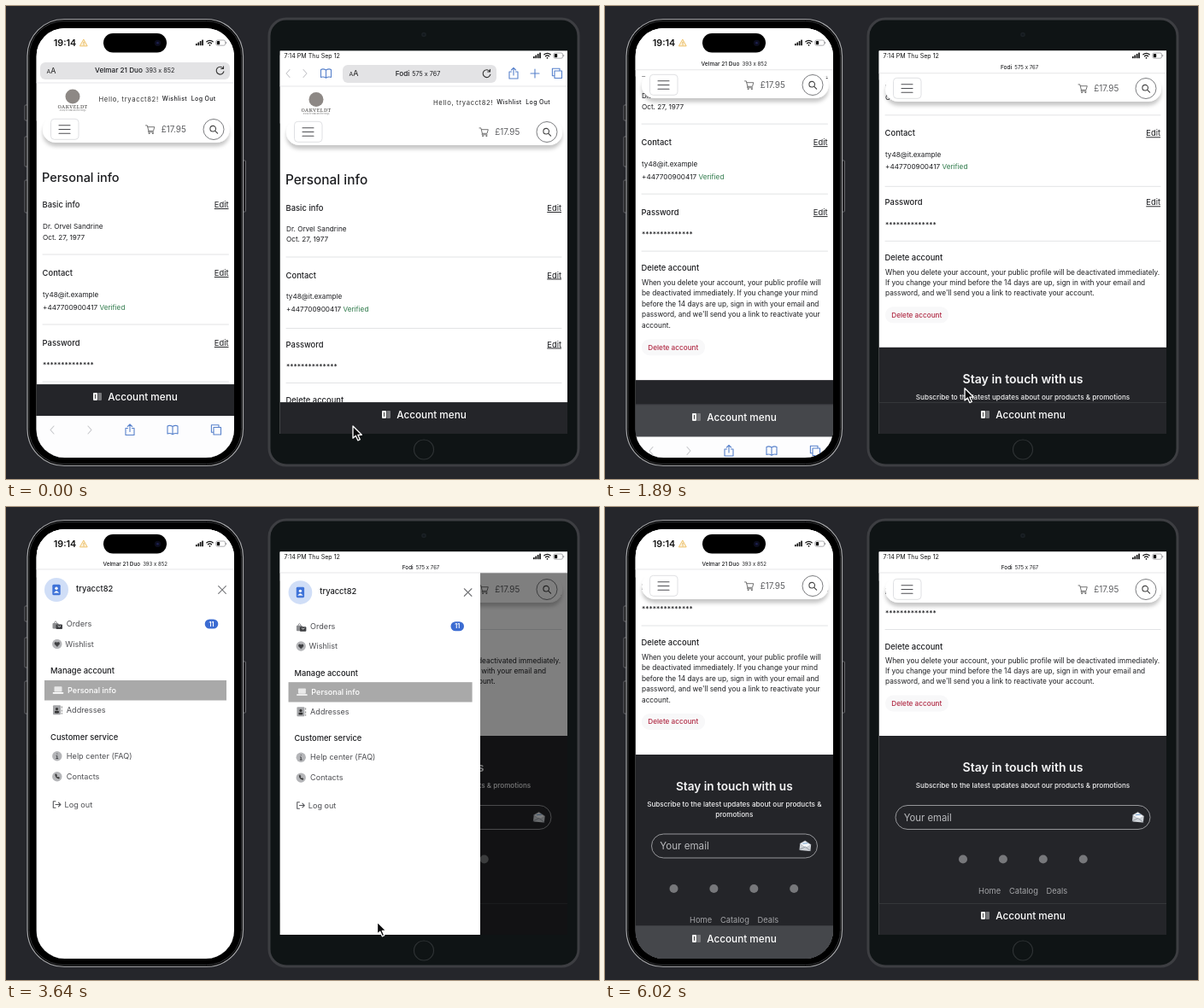
These frames come from a looping animation (694 by 554 pixels, 6440 ms). An HTML page:

```html
<!DOCTYPE html>
<html lang="en">
<head>
<meta charset="utf-8">
<title>Account menu on two devices</title>
<style>
html, body { margin: 0; width: 100%; height: 100%; overflow: hidden; background: #25262b; }
svg { display: block; width: 694px; height: 554px; font-family: Inter, Roboto, sans-serif; }
text { white-space: pre; }
</style>
</head>
<body>
<svg id="stage" viewBox="0 0 694 554" xmlns="http://www.w3.org/2000/svg"></svg>
<script>
const LOOP = 6440, STEP = 70;
const DARK = '#242529', BLUE = '#5680cb';

// Markup helpers
const text = (x, y, s, size, fill = '#1c1d20', weight = 400, extra = '') =>
  `<text x="${x}" y="${y}" font-size="${size}" fill="${fill}" font-weight="${weight}" ${extra}>${s}</text>`;
const mid = 'text-anchor="middle"', end = 'text-anchor="end"';
const rect = (x, y, w, h, fill, rx = 0, extra = '') =>
  `<rect x="${x}" y="${y}" width="${w}" height="${h}" rx="${rx}" fill="${fill}" ${extra}/>`;
const disc = (x, y, r, fill, extra = '') => `<circle cx="${x}" cy="${y}" r="${r}" fill="${fill}" ${extra}/>`;
const line = (d, stroke, w = 1, fill = 'none') =>
  `<path d="${d}" fill="${fill}" stroke="${stroke}" stroke-width="${w}" stroke-linecap="round" stroke-linejoin="round"/>`;
const at = (x, y, s) => `<g transform="translate(${x} ${y})">${s}</g>`;
const group = (id, s, extra = '') => `<g id="${id}" ${extra}>${s}</g>`;

const phone = {
  id: 'p', x: 35.5, y: 26, w: 231.5, h: 503, rx: 33, L: 43, R: 260.5,
  rows: [206.2, 236, 261, 273.5, 291, 316, 340.5, 355.5, 373, 398, 422.5, 440, 463],
  titleSize: 14.5, max: 301, stick: 52, ease: .985, closeAt: 5227,
  para: ['When you delete your account, your public profile will', 'be deactivated immediately. If you change your mind',
    'before the 14 days are up, sign in with your email and', "password, and we'll send you a link to reactivate your", 'account.'],
  paraY: 178.8, paraStep: 12.45, btnY: 251.5,
  foot: 290, cx: 151.3, staySize: 13.65, stayY: 331.7, subY: 351.3,
  sub: ['Subscribe to the latest updates about our products &amp;', 'promotions'],
  inX: 54.5, inW: 194, inY: 383, inSize: 11.6, socialX: 80.5, socialY: 447, linkX: 99, linkY: 487.3,
  logoX: 78, logoY: 106, helloX: 108.5, helloY: 112, navY: 144.5, menuX: 52.5, cartX: 168.5, findX: 243,
  barX: 102, barY: 443, barMove: 47,
  top: 90, topEnd: 73, name: 'Velmar 21 Duo', dims: '393 x 852', nameX: [150.7, 151.2], nameY: [78.3, 68.6],
  pill: [40, 66, 222, 20], panelW: 232.5, panelT: 'translate(0 0)', right: 267.5
};
const tablet = {
  id: 't', x: 320.5, y: 52.5, w: 336.5, h: 448.5, rx: 0, L: 328, R: 650,
  rows: [209, 240, 264, 276, 294, 318.5, 343, 357.5, 377.5, 399.5, 424.8, 441.5, 464.5],
  titleSize: 15.4, max: 298, stick: 51, ease: .893, closeAt: 5217,
  para: ['When you delete your account, your public profile will be deactivated immediately.',
    'If you change your mind before the 14 days are up, sign in with your email and',
    "password, and we'll send you a link to reactivate your account."],
  paraY: 182.8, paraStep: 12.25, btnY: 230,
  foot: 268, cx: 489, staySize: 14.05, stayY: 309.8, subY: 329.3,
  sub: ['Subscribe to the latest updates about our products &amp; promotions'],
  inX: 340, inW: 298, inY: 349.5, inSize: 11.3, socialX: 419, socialY: 412.5, linkX: 437, linkY: 452.8,
  logoX: 363, logoY: 109.5, helloX: 500, helloY: 115.7, navY: 147.5, menuX: 337.5, cartX: 559, findX: 633,
  barX: 440, barY: 464, barMove: 0,
  top: 94, topEnd: 77, name: 'Fodi', dims: '575 x 767', nameX: [482, 485.5], nameY: [82, 73],
  pill: [394, 69, 180, 21], panelW: 234.5, panelT: 'translate(285.9 3.8) scale(.992)', right: 271.3
};

const search = disc(0, 0, 12, '#fff', 'stroke="#6d6e71" stroke-width=".9"') +
  disc(-.8, -.8, 3.3, 'none', 'stroke="#444" stroke-width="1.1"') + line('M1.8 1.8L4.6 4.6', '#444', 1.2);
const cart = line('M-5 -4.6h1.8l1.6 6.4h5.6l1.3 -4.6h-7.8M-1.6 1.8l-.3 1.5h6', '#666', .9) + disc(-.9, 4.7, .9, '#666') + disc(3.4, 4.7, .9, '#666');
const burger = rect(0, -12.2, 32.5, 24, '#fff', 4, 'stroke="#dcdde0" stroke-width=".9"') +
  line('M9.5 -4.8h13M9.5 0h13M9.5 4.8h13', '#4d4e52', 1.1);
const envelope = `<g transform="rotate(6)">${rect(-6.5, -2, 13, 7.5, '#cfd3d8', 1)}` +
  line('M-6.5 -2L-1 -6L6.5 -2L1 2Z', '#aab1ba', .6, '#f5f7f9') + line('M-6.5 5L0 1L6.5 5', '#7d858f', .7) +
  line('M-3 -2.5L2 -3.5', '#5b8fc4', .8) + '</g>';
const share = line('M-2.5 -2h-2.5v8h10v-8h-2.5M0 2v-8.5M-2.6 -4l2.6 -2.6l2.6 2.6', BLUE, 1.1);
const book = line('M0 -4q-3 -1.8 -6 -.6v9q3 -1 6 .8q3 -1.8 6 -.8v-9q-3 -1.2 -6 .6v9', BLUE, 1.1);
const tabs = line('M-3 -3h8.5v8.5h-8.5zM-3 2.8h-2.6v-8.6h8.6v2.6', BLUE, 1.1);
const chevron = dir => line(`M${2 * dir} -4.5L${-2 * dir} 0L${2 * dir} 4.5`, '#c5c6ca', 1.1);
const reload = line('M3.8 -2.4A4.4 4.4 0 1 0 4.4 1M4 -5v2.8h-2.8', '#333', 1.1);
const cross = line('M-4.3 -4.3L4.3 4.3M4.3 -4.3L-4.3 4.3', 'currentColor', 1.2);

function page(d) {
  const { L, R, rows: r } = d;
  const head = (y, s) => text(L - .4, y, s, 9.4, '#1c1d20', 500) + text(R, y, 'Edit', 9.4, '#1c1d20', 400, end + ' text-decoration="underline"');
  const rule = y => line(`M${L} ${y}H${R}`, '#dfe0e2', .9);
  const socials = [0, 1, 2, 3].map(i => disc(d.socialX + i * 46.9, d.socialY, 5, '#77787b')).join('');
  const links = ['Home', 'Catalog', 'Deals'].map((s, i) => text(d.linkX + [0, 36, 79.5][i], d.linkY, s, 9.3, '#a3a4a7')).join('');
  const lower = d.para.map((s, i) => text(L, d.paraY + i * d.paraStep, s, 8.25)).join('') +
    rect(L, d.btnY - 9.5, 74, 19, '#f8f8f9', 9) + text(L + 7.3, d.btnY + 2.9, 'Delete account', 8.2, '#b02a44', 500) +
    rect(d.x, d.foot, d.w, 400, DARK) +
    text(d.cx, d.stayY, 'Stay in touch with us', d.staySize, '#f4f4f5', 600, mid) +
    d.sub.map((s, i) => text(d.cx, d.subY + i * 11.8, s, 8.15, '#f0f0f1', 500, mid)).join('') +
    rect(d.inX, d.inY, d.inW, 28, DARK, 14, 'stroke="#a2a3a6" stroke-width=".9"') +
    text(d.inX + 9.8, d.inY + 18.2, 'Your email', d.inSize, '#b9babd') +
    at(d.inX + d.inW - 14, d.inY + 14, envelope) + socials + links;
  return text(L - 1, r[0], 'Personal info', d.titleSize, '#1c1d20', 500) +
    head(r[1], 'Basic info') + text(L, r[2], 'Dr. Orvel Sandrine', 8.2) + text(L, r[3], 'Oct. 27, 1977', 8.2) + rule(r[4]) +
    head(r[5], 'Contact') + text(L, r[6], 'ty48@it.example', 8.2) +
    text(L, r[7], '+447700900417 <tspan fill="#2f7a4b">Verified</tspan>', 8.2) + rule(r[8]) +
    head(r[9], 'Password') + text(L, r[10], '*'.repeat(14), 8.2, '#1c1d20', 500) + rule(r[11]) +
    text(L - .4, r[12], 'Delete account', 9.4, '#1c1d20', 500) + at(0, d.max, lower);
}

function header(d) {
  const y = d.navY, x = d.helloX;
  return rect(d.L, y - 14.5, d.R - d.L + 1, 30, '#fff', 15, 'filter="url(#soft)"') +
    rect(d.x, y - 90, d.w, 80, '#fff') +
    disc(d.logoX, d.logoY, 8.5, '#8d8885') +
    text(d.logoX, d.logoY + 14.3, 'OAKVELDT', 5.8, '#3a3836', 400, mid + ' font-family="Noto Serif, serif" letter-spacing=".5"') +
    text(d.logoX, d.logoY + 17.3, 'a shop for small and fine things', 2.1, '#777', 400, mid) +
    text(x, d.helloY, 'Hello, tryacct82!', 7.7, '#333', 400, 'letter-spacing=".6"') +
    text(x + 74.3, d.helloY - 1, 'Wishlist', 7, '#1c1d20', 500, 'letter-spacing=".35"') +
    text(x + 108.3, d.helloY - 1, 'Log Out', 7, '#1c1d20', 500, 'letter-spacing=".35"') +
    at(d.menuX, y, burger) + at(d.cartX, y, cart) + text(d.cartX + 13.2, y + 3.4, '£17.95', 9.9, '#5f6063') +
    at(d.findX, y, search);
}

function bar(d) {
  return `<rect id="${d.id}Bar" x="${d.x}" y="${d.barY}" width="${d.w}" height="100"/>` +
    line(`M${d.x} ${d.barY + .5}h${d.w}`, '#3a3b3f', .8) +
    group(d.id + 'BarText', at(d.barX, d.barY + 14.4, rect(0, -4.3, 5, 8.8, '#f2f2f2', .8) + rect(5.4, -4.3, 4.6, 8.8, '#77787b', .8) +
      line('M2.5 -2v4', '#444', 1) + text(17.2, 4.1, 'Account menu', 11.75, '#fff', 500)));
}

function panel(d) {
  const R = d.right, dark = '#55565a';
  const item = (x, y, s, fill = '#4d4e52', w = 400) => text(x, y, s, 9.15, fill, w);
  const title = (y, s) => text(52, y, s, 9.4, '#1c1d20', 500);
  const badge = rect(R - 34.8, 131.4, 15.6, 11.2, '#3c6cd2', 5.6) + text(R - 27, 139.6, '11', 7, '#fff', 700, mid);
  const close = at(R - 14.5, 97, group(d.id + 'Ring', rect(-10, -10, 20, 20, '#fff', 1, 'stroke="#c6d6ee" stroke-width="2.6"')) +
    group(d.id + 'Close', cross));
  const round = (y, s) => at(59.8, y, disc(0, 0, 5.7, '#b4b5b8') + s);
  return rect(d.x, d.y, d.panelW, 510, '#fff') + `<g transform="${d.panelT}">` +
    disc(59, 97, 14, '#d0def7') + rect(54.3, 90.7, 9.4, 12.6, '#3f73d8', 1.5) + disc(59, 95.3, 1.7, '#fff') +
    line('M56.5 100.3q2.5 -3.6 5 0z', '#fff', .5, '#fff') +
    text(82, 99.2, 'tryacct82', 9.4, '#1c1d20', 500) + close +
    at(60, 138, rect(-5.5, -2, 7, 6.5, '#8c8d90', 1) + line('M-3.5 -2q1.5 -5 3 0', '#8c8d90') + rect(-1.5, -.5, 7.5, 5.5, '#3f4043', 1) + line('M.8 1.5q1.5 2 3 0', '#fff', .8)) +
    item(70.8, 140.4, 'Orders') + badge +
    round(160.5, line('M0 3L-2.7 .2q-.8 -2.4 1.3 -2.5q1 0 1.4 1q.4 -1 1.4 -1q2.1 .1 1.3 2.5z', '#3f4043', .4, '#3f4043')) + item(69.2, 163.8, 'Wishlist') +
    title(195.4, 'Manage account') + rect(45, 203, R - 54.5, 23.5, '#a9a9a9') +
    at(61, 214.3, rect(-4.5, -4, 9, 6.3, '#e8e8e8', .8) + rect(-6.3, 2.8, 12.6, 1.6, '#fff', .6)) +
    item(72, 217.5, 'Personal info', '#fff', 500) +
    at(60, 237.8, rect(-5, -5.5, 9, 11, '#a3a4a7', 1) + disc(-.5, -1.3, 1.6, '#333') + rect(-3, 1, 5, 2.6, '#333', 1.2) + line('M5.3 -4v1.5M5.3 0v1.5M5.3 3.5v1', '#888')) +
    item(70.8, 241.2, 'Addresses') +
    title(272.8, 'Customer service') +
    round(291.8, line('M-.8 -.4h.8v3M-1 2.8h2M0 -2.8v.1', '#3f4043', 1)) + item(70.8, 295, 'Help center (FAQ)') +
    round(315.8, line('M-2.2 -2.4q.2 4 4.4 4.8l.6 -1.2l-1.6 -.8l-.7 .5q-1 -.5 -1.3 -1.4l.6 -.7l-.7 -1.6z', '#333', .5, '#333')) + item(70.8, 319, 'Contacts') +
    at(59.5, 348.5, line('M-1.5 -3.8h-2.7v7.6h2.7M-1.5 0h5.8M2 -2.4L4.4 0L2 2.4', dark, 1.1)) + item(68.5, 351.9, 'Log out') + '</g>';
}

function status(x, y) {
  const bars = [0, 1, 2, 3].map(i => rect(x + i * 2.4, y + 1 - i * 1.5, 1.7, 2.3 + i * 1.5, '#111', .5)).join('');
  return bars + at(x + 16.5, y + 2.8, line('M-3.6 -4q3.6 -3 7.2 0M-2 -2q2 -1.7 4 0', '#111', 1.3) + disc(0, 0, .9, '#111')) +
    rect(x + 23.8, y - 3, 10.8, 6.2, 'none', 1.8, 'stroke="#9a9a9d" stroke-width=".8"') +
    rect(x + 24.8, y - 2, 3.4, 4.2, '#111', .8) + rect(x + 35.2, y - 1, 1, 2.2, '#9a9a9d', .5);
}

function chrome(d) {
  const [x, y, w, h] = d.pill, cy = y + h / 2 - .3, isPhone = d === phone;
  const extras = isPhone ? '' :
    at(330, 79, chevron(1)) + at(350, 79, chevron(-1)) + at(374.5, 79, book) + at(594, 79, share) +
    at(619, 79, line('M-5 0h10M0 -5v10', BLUE, 1.1)) + at(645, 79, tabs);
  const clock = isPhone
    ? text(55.8, 47.4, '19:14', 10.7, '#111', 600) + line('M91 39.3l4.2 7.6h-8.4z', '#efc36c', 1, '#fdf3dc') + line('M91 42.2v2M91 45.6v.1', '#d89a2b', .8) +
      rect(114, 32, 74, 22.5, '#000', 11.2) + disc(177.5, 43.3, 3.6, '#0c0d1d') + disc(177.5, 43.3, 1.3, '#1d2050') + status(222, 43)
    : text(325.5, 60.8, '7:14 PM Thu Sep 12', 7.1, '#111') + status(617, 58);
  return group(d.id + 'Top', rect(d.x, d.y - 30, d.w, d.top - d.y + 30, '#fff') + line(`M${d.x} ${d.top}h${d.w}`, '#dcdcde', .7)) +
    group(d.id + 'Pill', rect(x, y, w, h, '#e3e3e5', 6) + text(x + 7.5, cy + 3.2, '<tspan font-size="6.8">A</tspan>A', 9, '#222') +
      at(x + w - 11.5, cy, reload) + extras) +
    `<text id="${d.id}Name" text-anchor="middle" font-weight="500" fill="#1c1d20">${d.name}<tspan id="${d.id}Dims" dx="3" font-weight="400">${d.dims}</tspan></text>` +
    clock;
}

function toolbar() {
  const icons = [[54, chevron(1)], [98, chevron(-1)], [145, share], [195, book], [246, tabs]];
  return group('toolbar', rect(35, 480, 232.5, 60, '#fdfdfe') + icons.map(([x, s]) => at(x, 496.5, s)).join(''));
}

const screen = d => `<clipPath id="${d.id}Clip">${rect(d.x, d.y, d.w, d.h, '#000', d.rx)}</clipPath><g clip-path="url(#${d.id}Clip)">` +
  rect(d.x, d.y, d.w, d.h, '#fff') + group(d.id + 'Page', page(d)) + group(d.id + 'Head', header(d)) +
  group(d.id + 'BarBox', bar(d)) + rect(d.x, d.y, d.w, d.h, '#000', 0, `id="${d.id}Shade"`) +
  group(d.id + 'Panel', panel(d)) + chrome(d) + (d === phone ? toolbar() : '') + '</g>';

const keys = [[22, 116, 18], [22, 153, 35], [22, 204, 38], [276.5, 181, 60]];
const phoneBody = keys.map(([x, y, h]) => rect(x, y, 4, h, '#1a1a1c', 1, 'stroke="#77787b" stroke-width=".8"')).join('') +
  rect(25, 15.5, 252.5, 523, '#000', 43, 'stroke="#a5a6a9" stroke-width="1.2"') +
  rect(27, 17.5, 248.5, 519, 'none', 41, 'stroke="#353639" stroke-width="1"');
const tabletBody = rect(308, 15, 362, 523, '#0f1415', 20, 'stroke="#3d3e42" stroke-width="3"') +
  disc(489, 33.5, 2.8, '#1b2125') + disc(489, 33.5, 1.2, '#11171d') +
  disc(489, 519.5, 11.5, '#0f1415', 'stroke="#2f3335" stroke-width="1.2"');

const arrow = line('M0 0V14.2L3.3 11.2L5.8 16.8L8.3 15.7L5.8 10.3H10.3Z', '#fff', 1.3, '#0b0b0c');
const hand = line('M-1.6 10V1.2a1.6 1.6 0 0 1 3.2 0V6.5a1.5 1.5 0 0 1 2.8 .3a1.5 1.5 0 0 1 2.7 .5a1.4 1.4 0 0 1 2.4 1V12q0 3 -1.6 5.5H-.6L-5.6 11.4q-.9 -1.7 .6 -2.2q1 -.2 1.8 .9z', '#111', 1.1, '#fff') +
  line('M1.6 11.2v3.4M4 11.2v3.4M6.4 11.2v3.4M1.6 6.5v2.5M4.4 7v2M7.1 7.5v1.8', '#111', .8);

document.getElementById('stage').innerHTML =
  '<defs><filter id="soft" x="-10%" y="-40%" width="120%" height="200%"><feDropShadow dx="0" dy="4.5" stdDeviation="2.2" flood-color="#000" flood-opacity=".22"/></filter></defs>' +
  rect(0, 0, 694, 554, '#25262b') + phoneBody + tabletBody + screen(phone) + screen(tablet) +
  group('cursor', group('arrow', arrow) + group('hand', hand));

// Motion
const $ = id => document.getElementById(id);
const part = (t, a, b) => Math.min(1, Math.max(0, (t - a) / (b - a)));
const smooth = u => u * u * (3 - 2 * u);
const mix = (a, b, u) => a + (b - a) * u;
const move = (id, x, y) => $(id).setAttribute('transform', `translate(${x} ${y})`);
const show = (id, on) => $(id).setAttribute('opacity', +on);

const path = [
  [0, 406, 492], [140, 406, 492], [210, 405.5, 493], [420, 405.5, 493], [700, 418, 399], [770, 418, 399],
  [1330, 421, 449], [1610, 421, 449], [2240, 421, 446], [2520, 421, 446], [2800, 434.5, 486], [3850, 434.5, 486],
  [4550, 536, 91], [4620, 536, 91], [4830, 534, 97], [5180, 534, 97], [5250, 530, 101], [5320, 530, 101],
  [5880, 486, 541], [5950, 325, 541]
];

function cursorAt(t) {
  const i = path.findIndex(k => k[0] > t);
  if (i < 0) return path[path.length - 1].slice(1);
  const [a, x, y] = path[i - 1], [b, x2, y2] = path[i], u = smooth(part(t, a, b));
  return [mix(x, x2, u), mix(y, y2, u)];
}

function drawDevice(d, t) {
  const id = d.id, isPhone = d === phone;
  const fold = part(t, 1540, 2240), topFold = part(t, 1540, 1930);
  const scroll = d.max * smooth(fold ** d.ease);
  move(id + 'Page', 0, -scroll);
  move(id + 'Head', 0, -Math.min(scroll, d.stick));
  move(id + 'BarBox', 0, d.barMove * fold);
  move(id + 'BarText', 0, isPhone ? fold : 0);

  const lit = isPhone
    ? part(t, 980, 1130) - part(t, 3010, 3150) + part(t, 5600, 5750)
    : part(t, 2660, 2800) - part(t, 3500, 3640);
  const [r, g, b] = [[36, 69], [37, 71], [41, 75]].map(([a, c]) => Math.round(mix(a, c, lit)));
  $(id + 'Bar').setAttribute('fill', `rgb(${r},${g},${b})`);

  const open = smooth(part(t, 3274, 3574)) - smooth(part(t, d.closeAt, d.closeAt + 300));
  move(id + 'Panel', -(d.panelW + 1) * (1 - open), 0);
  show(id + 'Panel', open > 0);
  show(id + 'Shade', .5 * (part(t, 3267, 3417) - part(t, 5217, 5367)));
  show(id + 'Ring', !isPhone && t >= 5110);
  $(id + 'Close').setAttribute('color', !isPhone && t >= 4620 ? '#000' : '#77787b');

  const [px, py, pw, ph] = d.pill, cx = px + pw / 2, k = 1 - .1 * topFold;
  move(id + 'Top', 0, (d.topEnd - d.top) * topFold);
  $(id + 'Pill').setAttribute('transform',
    `translate(${cx * (1 - k)} ${(py + ph / 2) * (1 - k) - 9 * topFold}) scale(${k})`);
  show(id + 'Pill', 1 - part(topFold, .2, .8));
  const name = $(id + 'Name');
  name.setAttribute('x', mix(...d.nameX, topFold));
  name.setAttribute('y', mix(...d.nameY, topFold));
  name.setAttribute('font-size', mix(8.2, 6.4, topFold));
  $(id + 'Dims').setAttribute('font-size', mix(7.2, 6, topFold));
  if (isPhone) move('toolbar', 0, 49 * fold);
}

function draw(t) {
  drawDevice(phone, t);
  drawDevice(tablet, t);
  move('cursor', ...cursorAt(t));
  const pointing = t >= 4480 && t < 5250;
  show('hand', pointing);
  show('arrow', !pointing && t < 6020);
}

function tick() {
  draw(Math.floor(performance.now() % LOOP / STEP) * STEP);
  requestAnimationFrame(tick);
}
tick();
</script>
</body>
</html>
```
